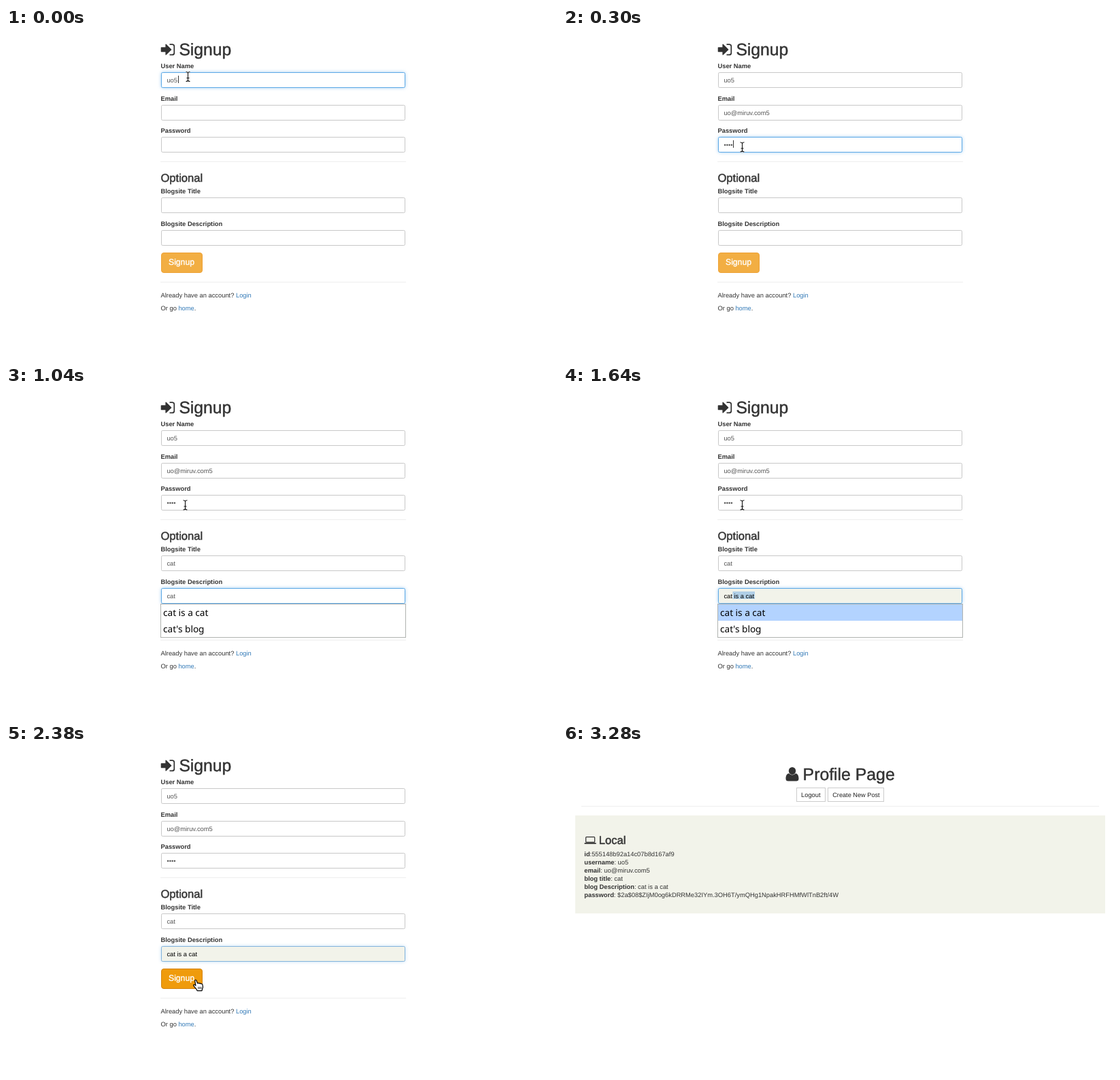
These frames come from a looping animation (810x485 px, 4.03 s). An HTML page:

```html
<!DOCTYPE html>
<html lang="en">
<head>
<meta charset="utf-8">
<title>Signup</title>
<style>
html, body { margin: 0; width: 100%; height: 100%; overflow: hidden; background: #fff; }
svg { display: block; }
text { font-family: "Liberation Sans", Arial, sans-serif; white-space: pre; text-rendering: geometricPrecision; }
.b { font-weight: bold; }
.h { stroke: #333; stroke-width: .45px; }
.menu { font-family: "Noto Sans", "Open Sans", sans-serif; }
</style>
</head>
<body>
<svg id="stage" width="810" height="485" viewBox="0 0 810 485"></svg>
<script>
const stage = document.getElementById('stage');
const LOOP = 4030;
const USER = 'uo5', MAIL = 'uo@miruv.com5', DOTS = '••••';
const OPTIONS = ['cat is a cat', "cat's blog"];

const text = (x, y, s, size = 9.33, fill = '#333', cls = '') =>
  `<text x="${x}" y="${y}" font-size="${size}" fill="${fill}" class="${cls}">${s}</text>`;
const rect = (x, y, w, h, fill, more = '') =>
  `<rect x="${x}" y="${y}" width="${w}" height="${h}" fill="${fill}" ${more}/>`;
const box = (x, y, w, h, fill, stroke, more = '') =>
  rect(x + .5, y + .5, w - 1, h - 1, fill, `stroke="${stroke}" ${more}`);
const path = (d, more) => `<path d="${d}" ${more}/>`;
const mix = (a, b, k) => `rgb(${a.map((v, i) => Math.round(v + (b[i] - v) * k))})`;

// focus: 0..1, caret and selection: x positions
function field(y, label, value = '', { focus = 0, auto, caret, select } = {}) {
  const glow = focus ? `style="filter:drop-shadow(0 0 2.6px rgba(102,175,233,${.6 * focus}))"` : '';
  return text(227.5, y - 6, label, 9.33, '#333', 'b')
    + box(228, y, 359, 23, auto ? '#f2f3ea' : '#fff', mix([200, 200, 200], [92, 168, 230], focus), `rx="1.8" ${glow}`)
    + (select ? rect(249.5, y + 5, select - 249.5, 11, '#b0cfe6') : '')
    + text(236.4, y + 14.6, value, 9.33, auto ? '#000' : '#555')
    + (caret ? rect(caret, y + 5, 1, 11, '#333') : '');
}

function menu(y, options, chosen) {
  const rows = options.map((s, i) =>
    (i === chosen ? rect(228, y + 1 + 24 * i, 359, 24, '#b3d3ff') : '')
    + text(231, y + 18 + 24 * i, s, 13.6, '#000', 'menu'));
  return box(227, y, 361, 24 * options.length + 2, '#fff', '#b0b3b0') + rows.join('');
}

function beam(x, y) {
  const d = `M${x - 3} ${y - 7}q3 0 3 2q0-2 3-2M${x} ${y - 5}v10M${x - 3} ${y + 7}q3 0 3-2q0 2 3 2M${x - 2} ${y + 2}h4`;
  return path(d, 'fill="none" stroke="#fff" stroke-width="2.4" opacity=".7"')
    + path(d, 'fill="none" stroke="#111" stroke-width="1.1"');
}

const hand = () =>
  path('M277.6 347.5q1-1.5 2.3 0l1.7 4.3q1.6-1.2 2.4.2q1.7-.9 2.3.5q2-.6 2.6 1.2l.6 3.5-.9 2.8-.6 2.6h-7l-1-2.3-3.6-4.2q-1.4-1.8-.4-2.3q1.3-.6 2.9 1.3z',
    'fill="#fff" stroke="#000" stroke-width="1.2" stroke-linejoin="round"')
  + path('M282.8 356.8v3.4m2 -3.4v3.4m2 -3.4v3.4', 'stroke="#000" stroke-width=".8"');

function signup({ user, mail, pass, title, desc, hover, over = '' }) {
  return path('M228.4 28.9h6.7v-4.6l7.5 7.4l-7.5 7.4v-4.6h-6.7z', 'fill="#333" stroke="#333" stroke-width="1.4" stroke-linejoin="round"')
    + path('M240.5 24h3.8a3 3 0 0 1 3 3v9.4a3 3 0 0 1-3 3h-3.8', 'fill="none" stroke="#333" stroke-width="1.75"')
    + text(254.4, 40, 'Signup', 24.7, '#333', 'h')
    + field(65, 'User Name', ...user) + field(113, 'Email', ...mail) + field(160, 'Password', ...pass)
    + rect(227, 196, 361, 1, '#eee')
    + text(227.4, 226, 'Optional', 16.6, '#333', 'h')
    + field(249, 'Blogsite Title', ...title) + field(297, 'Blogsite Description', ...desc)
    + box(228, 330, 61, 30, hover ? '#ef9b0c' : '#f2ae43', hover ? '#d58512' : '#eea236', 'rx="3.5"')
    + text(239, 348, 'Signup', 12.2, '#fff" stroke="#fff" stroke-width=".35')
    + rect(227, 373, 361, 1, '#eee')
    + text(227.5, 396, 'Already have an account? <tspan fill="#337ab7">Login</tspan>')
    + text(227.5, 415, 'Or go <tspan fill="#337ab7">home</tspan>.')
    + over;
}

function profile(over = '') {
  const rows = [
    ['id', ':555148b92a14c07b8d167af9'], ['username', ': ' + USER], ['email', ': ' + MAIL],
    ['blog title', ': cat'], ['blog Description', ': cat is a cat'],
    ['password', ': $2a$08$ZIjM0og6kDRRMe32IYm.3OH6T/ymQHg1NpakHRFHMfWlTnB2ft/4W']
  ];
  return '<ellipse cx="337" cy="39.5" rx="5.2" ry="5.6" fill="#333"/>'
    + path('M332 43.2C328.4 43.8 327.5 47.5 327.5 51C327.5 53.3 328.8 54.6 331 54.6H343C345.2 54.6 346.5 53.3 346.5 51C346.5 47.5 345.6 43.8 342 43.2Q337 48 332 43.2', 'fill="#333"')
    + text(352.6, 53, 'Profile Page', 24.8, '#333', 'h')
    + box(343, 64, 43, 21, '#fff', '#ccc') + text(350, 78, 'Logout', 9.33, '#222')
    + box(389, 64, 83, 21, '#fff', '#ccc') + text(396.2, 78, 'Create New Post', 9.2, '#222')
    + rect(27, 91, 761, 1, '#eee')
    + rect(18, 105, 779, 144, '#f2f3ea')
    + rect(33.6, 136.6, 13, 7.8, 'none', 'rx="1" stroke="#333" stroke-width="1.2"')
    + rect(31.4, 145.2, 17.4, 1.8, '#333', 'rx=".8"')
    + text(52.8, 147, 'Local', 16.6, '#333', 'h')
    + rows.map(([k, v], i) => text(31.3, 165 + 12 * i, `<tspan class="b">${k}</tspan>${v}`)).join('')
    + over;
}

const on = caret => ({ focus: 1, caret });
const empty = { user: [USER], mail: [], pass: [], title: [], desc: [] };
const filled = { ...empty, mail: [MAIL], pass: [DOTS], title: ['cat'] };
const cursor = beam(263.5, 175);
const full = OPTIONS[0];

const scenes = [
  [0, () => signup({ ...empty, user: [USER, on(253)], over: beam(267.5, 71.5) })],
  [150, () => signup({ ...empty, mail: [MAIL, on(304)], over: beam(265.5, 58.5) })],
  [300, () => signup({ ...empty, mail: [MAIL], pass: [DOTS, on(250)], over: cursor })],
  [450, () => signup({ ...filled, title: ['cat', on(249)], over: menu(273, [OPTIONS[1]]) + cursor })],
  [740, () => signup({ ...filled, title: ['cat', { focus: .7 }], desc: ['', { caret: 236 }], over: cursor })],
  [890, () => signup({ ...filled, desc: ['cat', on(249)], over: menu(320, OPTIONS) + cursor })],
  [1040, () => signup({ ...filled, desc: ['cat', on()], over: menu(320, OPTIONS) + cursor })],
  [1640, () => signup({ ...filled, desc: [full, { focus: 1, auto: true, select: 282 }], over: menu(320, OPTIONS, 0) + cursor })],
  [2090, () => signup({ ...filled, desc: [full, { focus: 1, auto: true, caret: 282 }], over: cursor })],
  [2380, () => signup({ ...filled, desc: [full, { focus: .65, auto: true }], hover: true, over: hand() })],
  [2530, () => profile(hand())],
  [3280, () => profile()]
];

let shown;
function tick() {
  const t = performance.now() % LOOP;
  const scene = scenes.findLast(([start]) => start <= t);
  if (scene !== shown) {
    shown = scene;
    stage.innerHTML = scene[1]();
  }
  requestAnimationFrame(tick);
}
tick();
</script>
</body>
</html>
```
